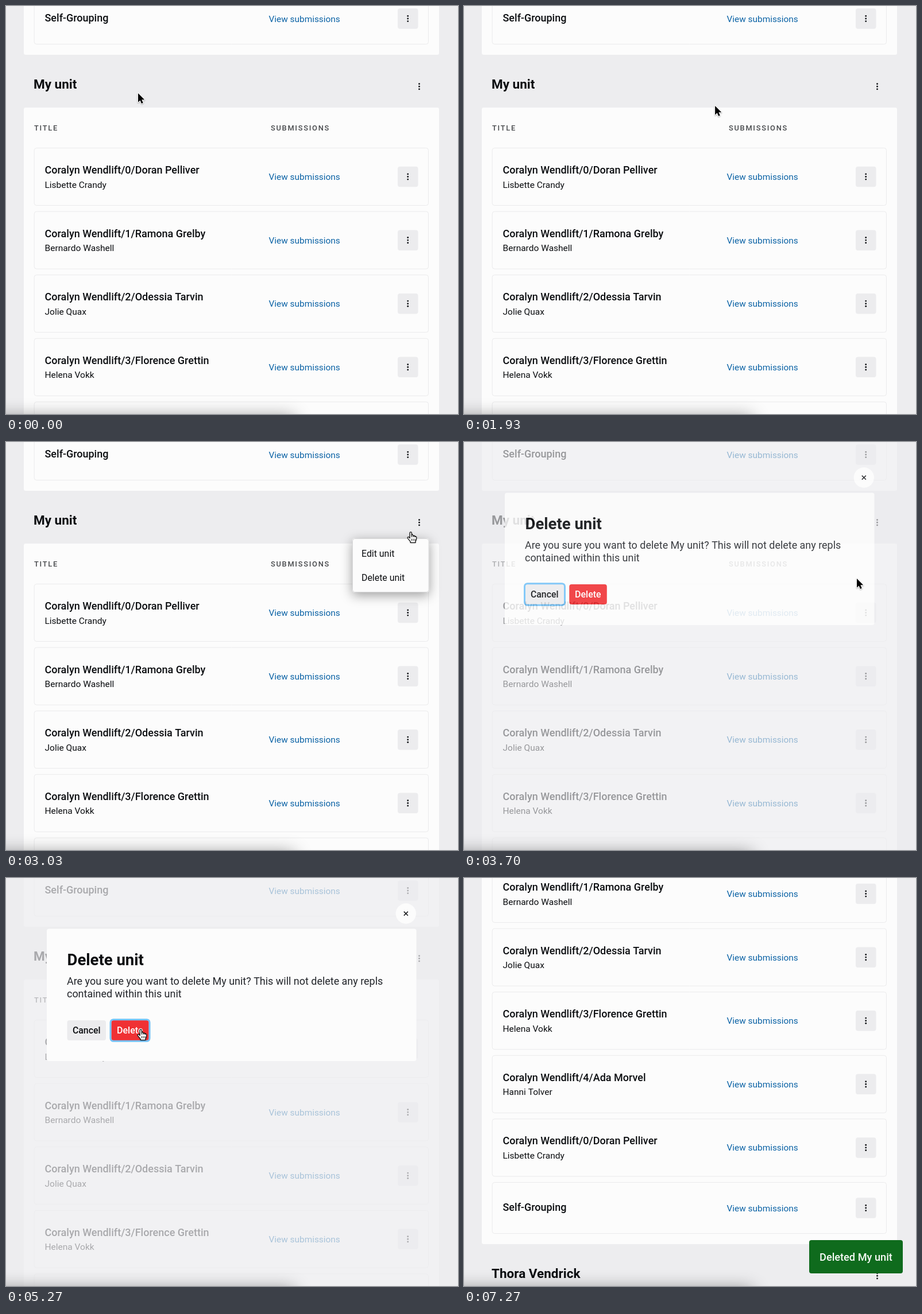
Write an HTML page with a canvas that moves like this. It is 787 px wide and 711 px high and loops after 7.36 s.

```html
<!DOCTYPE html>
<html lang="en">
<head>
<meta charset="utf-8">
<title>Delete unit</title>
<style>
  html, body { margin: 0; width: 100%; height: 100%; overflow: hidden; background: #ededef; }
  canvas { display: block; }
</style>
</head>
<body>
<canvas id="stage" width="787" height="711"></canvas>
<script>
const W = 787, H = 711, LOOP = 7360;
const T = { menu: 2470, dialog: 3630, confirm: 4900, deleted: 5670, hidden: 6500 };
const PAPER = '#fcfcfc', PAGE = '#ededef', BUTTON = '#ececee';
const INK = '#0b0d10', LINK = '#0a62a5';

const stage = document.getElementById('stage').getContext('2d');
const layer = document.createElement('canvas');
layer.width = W;
layer.height = H;
const dialog = layer.getContext('2d');

const OWNER = 'Coralyn Wendlift';
const PEOPLE = [
  ['Doran Pelliver', 'Lisbette Crandy'],
  ['Ramona Grelby', 'Bernardo Washell'],
  ['Odessia Tarvin', 'Jolie Quax'],
  ['Florence Grettin', 'Helena Vokk'],
  ['Ada Morvel', 'Hanni Tolver']
];

function text(c, s, x, y, size, weight = 400, color = INK, spacing = 0) {
  c.font = `${weight} ${size}px Roboto, Inter, sans-serif`;
  c.letterSpacing = spacing + 'px';
  c.fillStyle = color;
  c.fillText(s, x, y);
}

function box(c, x, y, w, h, r, fill, stroke, line = 1) {
  c.beginPath();
  c.roundRect(x, y, w, h, r);
  if (fill) {
    c.fillStyle = fill;
    c.fill();
  }
  if (stroke) {
    c.strokeStyle = stroke;
    c.lineWidth = line;
    c.stroke();
  }
}

function dots(c, x, y) {
  c.fillStyle = '#15171a';
  for (const dy of [-4.6, 0, 4.6]) {
    c.beginPath();
    c.arc(x, y + dy, 1.45, 0, 7);
    c.fill();
  }
}

function card(c, y, h, title, name) {
  const mid = y + h / 2;
  box(c, 49.2, y + .5, 686.3, h - 1, 4, PAPER, '#ebebec');
  text(c, title, 67.5, name ? y + 45 : y + 49.7, 18, 500);
  if (name) text(c, name, 67.5, y + 69.5, 15.5);
  text(c, 'View submissions', 457.5, mid + 5.5, 15.4, 400, LINK);
  box(c, 682, mid - 17.7, 35.5, 35.5, 4, BUTTON);
  dots(c, 699.7, mid);
}

function personCard(c, y, i) {
  card(c, y, 101, `${OWNER}/${i}/${PEOPLE[i][0]}`, PEOPLE[i][1]);
}

// The end of one unit's panel, followed by the heading of the next unit.
function unitEnd(c, bottom, next) {
  box(c, 31, -20, 723, bottom + 20, 3, PAPER);
  card(c, bottom - 108, 90, 'Self-Grouping');
  text(c, next, 48, bottom + 59, 22.5, 600);
  dots(c, 719.5, bottom + 55.3);
}

function unitPage(c) {
  unitEnd(c, 85, 'My unit');
  box(c, 31, 177, 723, 600, 3, PAPER);
  text(c, 'TITLE', 49, 216.7, 12.8, 500, '#46484b', 1.75);
  text(c, 'SUBMISSIONS', 461, 216.7, 12.8, 500, '#46484b', 1.75);
  for (let i = 0; i < 5; i++) personCard(c, 247 + i * 110.6, i);
}

function deletedPage(c) {
  unitEnd(c, 638, 'Thora Vendrick');
  [1, 2, 3, 4, 0].forEach((who, i) => personCard(c, -23 + i * 110.6, who));
}

function toast(c) {
  box(c, 601, 631, 163, 58, 4, '#0f6b1d');
  text(c, 'Deleted My unit', 619, 667, 18.2, 500, '#f7fbf7');
}

function menu(c) {
  c.save();
  c.shadowColor = 'rgba(0,0,0,.38)';
  c.shadowBlur = 20;
  c.shadowOffsetY = 5;
  box(c, 603, 168, 133.5, 94, 4, PAPER);
  c.restore();
  box(c, 603.5, 168.5, 132.5, 93, 4, null, '#d9d9da');
  text(c, 'Edit unit', 619, 200, 15.9);
  text(c, 'Delete unit', 619, 242, 15.9);
}

function drawDialog(c, confirmed) {
  c.clearRect(0, 0, W, H);
  c.fillStyle = 'rgba(237,237,239,.7)';
  c.fillRect(0, 0, W, H);
  box(c, 71, 88.5, 643.5, 230.5, 4, PAPER);

  c.beginPath();
  c.arc(696.3, 62, 17.7, 0, 7);
  c.fillStyle = PAPER;
  c.fill();
  c.beginPath();
  c.moveTo(692.8, 58.5);
  c.lineTo(699.8, 65.5);
  c.moveTo(699.8, 58.5);
  c.lineTo(692.8, 65.5);
  c.strokeStyle = '#15171a';
  c.lineWidth = 1.7;
  c.stroke();

  text(c, 'Delete unit', 106.5, 152, 27.5, 600);
  text(c, 'Are you sure you want to delete My unit? This will not delete any repls', 106, 186, 17.95, 400, '#22252a');
  text(c, 'contained within this unit', 106, 208, 17.95, 400, '#22252a');

  box(c, 106.5, 248, 67.5, 35, 4, BUTTON);
  box(c, 183.3, 248, 65.5, 35, 4, '#f03134');
  const [x, w] = confirmed ? [182, 68] : [105.5, 70];
  box(c, x, 246.7, w, 37.6, 5, null, '#75c3f8', 3);
  text(c, 'Cancel', 116, 271, 15.8, 500);
  text(c, 'Delete', 193, 271, 16, 500, '#fff');
}

// Soft shadow of something lying just below the stage.
function edgeShadow(c) {
  c.save();
  c.shadowColor = 'rgba(0,0,0,.43)';
  c.shadowBlur = 30;
  c.fillStyle = '#888';
  c.fillRect(-60, 716, 562, 60);
  c.restore();
}

const POINTERS = {
  arrow: new Path2D('M0 0V15.8L3.6 12.4 6 17.9 8.7 16.7 6.3 11.3H11.2Z'),
  hand: new Path2D('M-1.9 9V1.4C-1.9-.6 1.3-.6 1.3 1.4V6.6C2-.0 2 5.4 4.2 6V7.2C4.6 5.8 7 6 7.1 7.4V8.4C7.6 7.2 9.8 7.4 9.8 9.2C10 13 9.2 14 8 16V18.4H-.8V16.8C-2 14.5-4 13-5.7 10.5C-6.5 9-4.6 7.8-3.4 8.9L-1.9 10.6Z'),
  move: new Path2D('M0-7.6L3.1-4.2H1V-1H4.2V-3.1L7.6 0 4.2 3.1V1H1V4.2H3.1L0 7.6-3.1 4.2H-1V1H-4.2V3.1L-7.6 0-4.2-3.1V-1H-1V-4.2H-3.1Z')
};

const easeIn = p => p ** 3;
const easeOut = p => 1 - (1 - p) ** 2;
const easeBoth = p => p * p * (3 - 2 * p);

// time, x, y, easing towards this point
const PATH = [
  [970, 230, 152],
  [1930, 436, 174, easeIn],
  [2410, 705, 157, easeOut],
  [3060, 705, 157],
  [3230, 687, 190, easeIn],
  [3430, 684, 238, easeOut],
  [3700, 684, 238],
  [4350, 244, 256, easeBoth],
  [4450, 229, 261, easeOut],
  [4590, 235, 264, easeBoth],
  [5640, 235, 264],
  [5670, 235, 265]
];

function pointerAt(t) {
  const i = PATH.findIndex(p => p[0] > t);
  if (i === 0) return PATH[0].slice(1, 3);
  if (i < 0) return PATH[PATH.length - 1].slice(1, 3);
  const [t0, x0, y0] = PATH[i - 1];
  const [t1, x1, y1, ease = p => p] = PATH[i];
  const k = ease((t - t0) / (t1 - t0));
  return [x0 + (x1 - x0) * k, y0 + (y1 - y0) * k];
}

function pointerKind(t, x) {
  if (t >= T.deleted) return 'move';
  if (t >= T.dialog) return x < 249 ? 'hand' : 'arrow';
  return x > 680 ? 'hand' : 'arrow';
}

function pointer(c, t) {
  if (t >= T.hidden) return;
  const [x, y] = pointerAt(t);
  const kind = pointerKind(t, x);
  const shape = POINTERS[kind];
  c.save();
  c.translate(x, y);
  c.lineJoin = 'round';
  c.shadowColor = 'rgba(0,0,0,.3)';
  c.shadowBlur = 2;
  c.shadowOffsetY = 1;
  if (kind === 'hand') {
    c.fillStyle = '#fff';
    c.fill(shape);
    c.shadowColor = 'transparent';
    c.strokeStyle = '#111';
    c.lineWidth = 1.3;
    c.stroke(shape);
    c.lineWidth = 1;
    c.beginPath();
    for (const fx of [1.3, 4.1, 6.9]) {
      c.moveTo(fx, 11.5);
      c.lineTo(fx, 15.3);
    }
    for (const fx of [1.3, 4.2, 7.1]) {
      c.moveTo(fx, 6.5);
      c.lineTo(fx, 9);
    }
    c.stroke();
  } else {
    c.strokeStyle = '#fff';
    c.lineWidth = 2.2;
    c.stroke(shape);
    c.shadowColor = 'transparent';
    c.fillStyle = '#000';
    c.fill(shape);
  }
  c.restore();
}

function draw(t) {
  const c = stage;
  c.fillStyle = PAGE;
  c.fillRect(0, 0, W, H);
  if (t < T.deleted) unitPage(c);
  else deletedPage(c);

  if (t >= T.menu && t < T.dialog) menu(c);
  if (t >= T.dialog && t < T.deleted) {
    drawDialog(dialog, t >= T.confirm);
    c.globalAlpha = Math.min(1, (t - T.dialog) / 80);
    c.drawImage(layer, 0, 0);
    c.globalAlpha = 1;
  }
  edgeShadow(c);
  if (t >= T.deleted) toast(c);
  pointer(c, t);
}

const start = performance.now();
function tick() {
  draw((performance.now() - start) % LOOP);
  requestAnimationFrame(tick);
}
tick();
</script>
</body>
</html>
```
